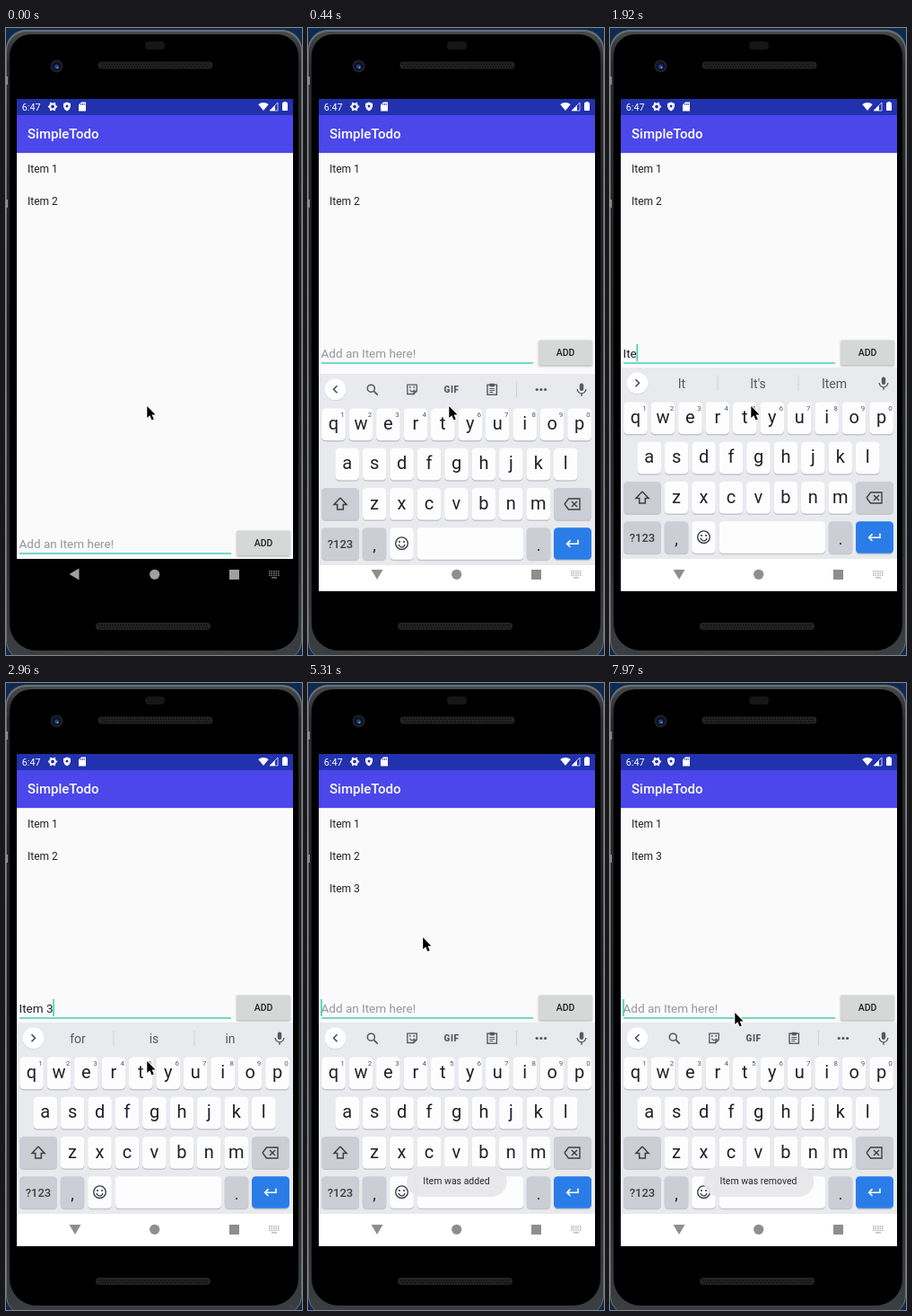
Animation, 330 px wide and 698 px high, one loop 8000 ms. Source, as an HTML page with a canvas:

```html
<!DOCTYPE html>
<html lang="en">
<head>
<meta charset="utf-8">
<title>Todo list demo</title>
<style>
html, body { margin: 0; width: 100%; height: 100%; overflow: hidden; background: #000; }
canvas { display: block; width: 330px; height: 698px; }
</style>
</head>
<body>
<canvas id="stage" width="330" height="698"></canvas>
<script>
const c = document.getElementById('stage').getContext('2d');
const LOOP = 8000, STEP = 147.6;
const INK = '#202124', ICON = '#55585d', KEY = '#fdfdfe', MOD = '#cbced4', TEAL = '#55cfbf';

// ---- helpers ----
const clamp = v => Math.max(0, Math.min(1, v));
const ramp = (k, a, b) => clamp((k - a) / (b - a));
const smooth = p => p * p * (3 - 2 * p);

function rect(x, y, w, h, fill) { c.fillStyle = fill; c.fillRect(x, y, w, h); }
function round(x, y, w, h, r, fill) {
  c.beginPath(); c.roundRect(x, y, w, h, r);
  c.fillStyle = fill; c.fill();
}
function disc(x, y, r, fill) {
  c.beginPath(); c.arc(x, y, r, 0, 7);
  c.fillStyle = fill; c.fill();
}
function ring(x, y, r, color, w) {
  c.beginPath(); c.arc(x, y, r, 0, 7);
  c.strokeStyle = color; c.lineWidth = w; c.stroke();
}
function trace(pts, x, y) {
  c.beginPath();
  for (let i = 0; i < pts.length; i += 2) c.lineTo(x + pts[i], y + pts[i + 1]);
}
function poly(pts, x, y, fill) { trace(pts, x, y); c.closePath(); c.fillStyle = fill; c.fill(); }
function line(pts, x, y, color, w = 1.4) { trace(pts, x, y); c.strokeStyle = color; c.lineWidth = w; c.stroke(); }
function text(s, x, y, size, color, align = 'left', weight = 400) {
  c.font = `${weight} ${size}px Roboto, sans-serif`;
  c.textAlign = align; c.fillStyle = color;
  c.fillText(s, x, y);
}
function faded(alpha, draw) {
  if (alpha <= 0) return;
  c.save(); c.globalAlpha = alpha; draw(); c.restore();
}

// ---- phone ----
const metal = c.createLinearGradient(0, 0, 0, 698);
[[0, '#4a4d4f'], [0.06, '#26282a'], [0.5, '#1c1d1e'], [0.85, '#2c2e30'], [1, '#3c3f41']]
  .forEach(([p, color]) => metal.addColorStop(p, color));

function speaker(x, y) {
  round(x, y, 128, 8, 4, '#242424');
  for (let i = 3; i < 125; i += 3) {
    rect(x + i, y + 2, 1.5, 1.5, '#0c0c0c');
    rect(x + i + 1, y + 5, 1.5, 1.5, '#0c0c0c');
  }
}
function phone() {
  rect(0, 0, 330, 698, '#0d2a50');
  round(0, 2, 330, 702, 22, '#6b6f72');
  round(1, 4, 328, 700, 22, metal);
  round(4, 7, 322, 686, [24, 24, 30, 30], '#000');
  rect(0, 54, 2, 9, '#8b8e90');
  rect(0, 191, 2, 9, '#8b8e90');
  round(155, 15, 22, 9, 4, '#161616');
  speaker(102.5, 37.5);
  speaker(100, 662);
  disc(56.5, 42.5, 7, '#1f2226');
  disc(56.5, 42.5, 5, '#0a1224');
  disc(56.5, 43, 2.5, '#24407c');
  disc(57.5, 44, 1, '#7d9fe0');
}

// ---- app ----
function statusBar() {
  rect(12, 79, 308, 18, '#2231ad');
  text('6:47', 17.8, 91.5, 10.8, '#fff');
  ring(52, 87.5, 2.9, '#fff', 2);
  for (let i = 0; i < 6; i++) {
    const a = i * Math.PI / 3;
    disc(52 + 4.2 * Math.cos(a), 87.5 + 4.2 * Math.sin(a), 1, '#fff');
  }
  poly([0, -5, 4, -3.5, 4, 0, 2.5, 3.2, 0, 5, -2.5, 3.2, -4, 0, -4, -3.5], 68, 87.5, '#fff');
  disc(68, 87, 1.5, '#2231ad');
  poly([-1, -5, 4, -5, 4, 5, -4, 5, -4, -2], 85, 87.5, '#fff');
  for (let i = 0; i < 3; i++) rect(83.2 + i * 1.8, 84, 0.9, 1.8, '#2231ad');
  c.beginPath(); c.moveTo(287, 92);
  c.arc(287, 92, 9, -Math.PI * 0.72, -Math.PI * 0.28);
  c.fillStyle = '#fff'; c.fill();
  line([0, 9, 9, 0, 9, 9, 0, 9], 294, 83, '#d5d9f5', 0.9);
  poly([0, 9, 6, 3, 6, 9], 294, 83, '#fff');
  rect(309.5, 82, 3, 2, '#fff');
  round(308, 83, 6, 9, 0.8, '#fff');
}
function item(s, y, alpha = 1) {
  faded(alpha, () => text(s, 24, y, 12, '#222'));
}
function list(k) {
  item('Item 1', 161);
  item('Item 2', 197, 1 - ramp(k, 46, 48));
  if (k >= 28) item('Item 3', 233 - 36 * smooth(ramp(k, 47, 50)), ramp(k, 27, 29));
}
function typed(k) {
  if (k < 10 || k >= 28) return '';
  if (k >= 18) return 'Item 3';
  if (k >= 16) return 'Item ';
  return 'Item'.slice(0, Math.max(1, k - 10));
}
function caretOn(k) {
  if (k < 9) return k >= 4 && k < 7;
  if (k < 18) return true;
  const from = k < 28 ? 2660 : 3930;
  return (k * STEP - from) % 1000 < 500;
}
function inputRow(k) {
  const y = k < 1 ? 573.5 : 361.5, s = typed(k);
  if (s) text(s, 14.5, y + 5.3, 13.5, '#222');
  else text('Add an Item here!', 14.5, y + 5.3, 13.5, '#979797');
  rect(15, y + 10.7, 236, 1.6, TEAL);
  if (caretOn(k)) {
    c.font = '400 13.5px Roboto, sans-serif';
    rect(14.3 + c.measureText(s).width, y - 9.5, 1.4, 19, '#20cdb8');
  }
  c.save();
  c.shadowColor = 'rgba(0,0,0,.3)'; c.shadowBlur = 2; c.shadowOffsetY = 1;
  round(257, y - 14, 60, 28, 1.5, k === 27 ? '#c3c4c4' : '#d6d7d7');
  c.restore();
  text('ADD', 287, y + 3.4, 10.5, '#212121', 'center', 500);
}
function app(k) {
  rect(12, 79, 308, 512, '#fafafa');
  statusBar();
  rect(12, 97, 308, 42, '#4b47eb');
  rect(12, 139, 308, 1, '#e6e6e9');
  text('SimpleTodo', 24, 123, 15, '#fff', 'left', 500);
  list(k);
  inputRow(k);
}

// ---- keyboard ----
function key(x, y, w, fill) {
  round(x, y + 1, w, 36, 4.5, '#c3c6cb');
  round(x, y, w, 35.5, 4.5, fill);
}
function letters(row, x, y, upper, digits) {
  [...row].forEach((ch, i) => {
    const cx = x + i * 30.45;
    key(cx - 13.3, y, 26.6, KEY);
    text(upper ? ch.toUpperCase() : ch, cx, y + 23.5, 20, INK, 'center');
    if (digits) text((i + 1) % 10, cx + 10, y + 9.2, 8, '#55585d', 'center');
  });
}
function mic() {
  round(302.8, 388.5, 4.4, 8.5, 2.2, ICON);
  c.beginPath(); c.arc(305, 395, 4.8, 0, Math.PI);
  c.strokeStyle = ICON; c.lineWidth = 1.3; c.stroke();
  rect(304.3, 400, 1.4, 2.8, ICON);
}
function tools() {
  ring(70.3, 394.2, 4, ICON, 1.6);
  line([0, 0, 4.5, 4.5], 73.2, 397.2, ICON, 1.8);
  line([2, 5.2, -5.2, 5.2, -5.2, -5.2, 5.2, -5.2, 5.2, 2, 2, 5.2, 2, 2, 5.2, 2], 116, 395.3, ICON, 1.3);
  rect(113, 392, 1.5, 1.8, ICON);
  rect(117.5, 392, 1.5, 1.8, ICON);
  c.beginPath(); c.arc(116, 395, 2.6, 0.2, 2.9); c.stroke();
  c.letterSpacing = '0.5px';
  text('GIF', 160, 398.8, 10, ICON, 'center', 900);
  c.letterSpacing = '0px';
  c.strokeStyle = ICON; c.lineWidth = 1.4;
  c.strokeRect(200, 390.2, 10.4, 11);
  rect(202.5, 388.8, 5.4, 3.6, ICON);
  for (let i = 0; i < 3; i++) rect(202.3, 394 + i * 2, i < 2 ? 5.8 : 4, 1, ICON);
  rect(232, 387, 1, 17, '#cfd2d6');
  for (let i = 0; i < 3; i++) disc(255.2 + i * 4.7, 395.5, 1.6, ICON);
}
function hints(k) {
  const words = k >= 16 ? ['for', 'is', 'in']
    : k >= 14 ? ['Item', 'Items', 'It']
    : k >= 12 ? ['It', "It's", 'Item'] : ['I', "I'm", 'It'];
  words.forEach((w, i) => text(w, 80 + i * 85, 400.7, 14, '#55585d', 'center'));
  rect(119.5, 387, 1, 17, '#cfd2d6');
  rect(209.5, 387, 1, 17, '#cfd2d6');
}
function keyboard(k) {
  const upper = k === 9 || k === 10, typing = k >= 10 && k < 28;
  rect(12, 378, 308, 213, '#e8eaed');
  rect(12, 591, 308, 260, '#fff');

  disc(30.5, 396, 12, '#d3d6da');
  disc(30.5, 395.3, 11.8, '#fff');
  const d = typing ? 1 : -1;
  line([-2 * d, -4, 2 * d, 0, -2 * d, 4], 30.5, 395.3, '#44474b', 1.5);
  if (typing) hints(k); else tools();
  mic();

  letters('qwertyuiop', 28.5, 416.5, upper, true);
  letters('asdfghjkl', 43.7, 460.8, upper);
  letters('zxcvbnm', 74, 505, upper);

  key(15, 505, 42, MOD);
  const arrow = [0, -7, 7, 0.5, 3.3, 0.5, 3.3, 6, -3.3, 6, -3.3, 0.5, -7, 0.5, 0, -7];
  if (upper) poly(arrow, 36, 523, '#3c4043');
  line(arrow, 36, 523, '#3c4043', 1.5);

  key(274, 505, 42, MOD);
  line([-9, 0, -4.5, -6, 8, -6, 8, 6, -4.5, 6, -9, 0], 295, 523, '#3c4043');
  line([-2, -3, 4, 3], 296, 523, '#3c4043');
  line([-2, 3, 4, -3], 296, 523, '#3c4043');

  const y = 549.2;
  key(15, y, 42, MOD);
  text('?123', 36, 571.5, 13, '#3c4043', 'center', 500);
  key(60.7, y, 26.6, MOD);
  text(',', 74, 575, 18, INK, 'center');
  key(91.2, y, 26.6, KEY);
  ring(104.5, 566.7, 6.8, '#3c4043', 1.4);
  disc(102, 565, 1.1, '#3c4043');
  disc(107, 565, 1.1, '#3c4043');
  c.beginPath(); c.arc(104.5, 567.3, 3.6, 0.2, 2.95); c.stroke();
  key(121.6, y, 118.6, KEY);
  key(243.7, y, 26.6, MOD);
  text('.', 257, 575, 18, INK, 'center');
  key(274, y, 42, '#2a7de8');
  line([6, -4.5, 6, 0, -6, 0], 295, 567.2, '#fff', 1.6);
  line([-2.5, -3.8, -6.3, 0, -2.5, 3.8], 295, 567.2, '#fff', 1.6);
}
function navBar(color, down) {
  if (down) poly([-6.5, -5, 6.5, -5, 0, 6], 77, 608, color);
  else poly([5, -6.5, 5, 6.5, -6, 0], 76.5, 608, color);
  disc(165.7, 608.3, 5.6, color);
  rect(249, 603, 11, 11, color);
}
function imeSwitch() {
  faded(0.75, () => {
    for (let r = 0; r < 3; r++)
      for (let i = 0; i < 5; i++) rect(293 + i * 2.5, 604 + r * 2.3, 1.6, 1.5, '#a0a0a0');
    rect(296, 611.2, 6, 1.4, '#a0a0a0');
  });
}
function toast(s, alpha) {
  faded(alpha, () => {
    c.font = '400 10.5px Roboto, sans-serif';
    const w = c.measureText(s).width + 37;
    faded(alpha * 0.93, () => round(166 - w / 2, 538, w, 34, 17, '#e8e8ea'));
    text(s, 165.5, 558, 10.5, '#2a2a2a', 'center');
  });
}

// ---- pointer: step, x, y ----
const PATH = [[0, 157, 421], [20, 157, 421], [24, 306, 336], [25, 292, 354], [26, 292, 354],
  [29, 145, 315], [34, 145, 315], [40, 79, 193], [48, 79, 193], [54, 139, 367]];
function pointer(k) {
  let i = 1;
  while (i < PATH.length - 1 && PATH[i][0] < k) i++;
  const [k0, x0, y0] = PATH[i - 1], [k1, x1, y1] = PATH[i];
  const p = smooth(ramp(k, k0, k1));
  const x = x0 + (x1 - x0) * p, y = y0 + (y1 - y0) * p;
  const shape = [0, 0, 0, 13, 3, 10.3, 5.3, 15.4, 7.5, 14.4, 5.3, 9.5, 9.2, 9.5];
  c.lineJoin = 'round';
  trace(shape, x + 0.3, y); c.closePath();
  c.strokeStyle = '#fff'; c.lineWidth = 2; c.stroke();
  c.fillStyle = '#000'; c.fill();
  c.lineJoin = 'miter';
}

function draw(t) {
  const k = Math.floor((t + 6) / STEP);
  phone();
  app(k);
  if (k < 1) {
    navBar('#a0a0a0', false);
    imeSwitch();
  } else {
    const drop = [0, 140, 40, 7][k] || 0;
    c.save();
    c.beginPath(); c.rect(12, 79, 308, 548); c.clip();
    c.translate(0, drop);
    keyboard(k);
    c.restore();
    navBar(k < 3 ? '#c6c7c9' : '#8e8e8e', k >= 3);
    if (k >= 3) imeSwitch();
  }
  toast('Item was added', ramp(k, 29, 31) * (1 - ramp(k, 41, 44)));
  toast('Item was removed', ramp(k, 48, 50));
  pointer(k);
}

function tick() {
  draw(performance.now() % LOOP);
  requestAnimationFrame(tick);
}
tick();
</script>
</body>
</html>
```
